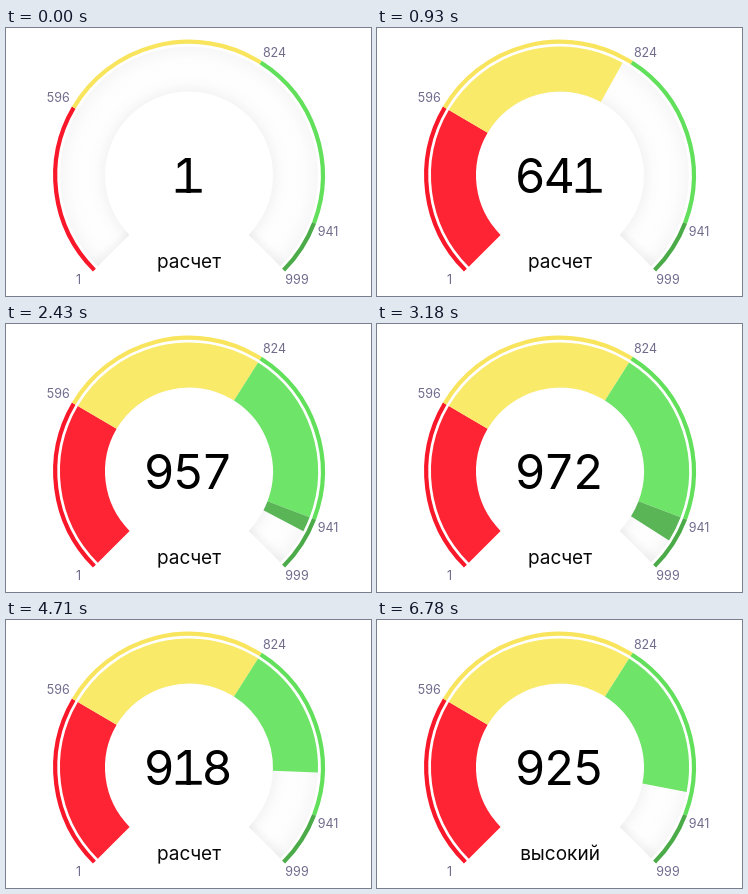
These frames come from a looping animation (365 px wide and 268 px high, 6840 ms). An HTML page with a canvas:

```html
<!DOCTYPE html>
<html lang="ru">
<head>
<meta charset="utf-8">
<title>Шкала</title>
<style>
  html, body { margin: 0; width: 100%; height: 100%; overflow: hidden; background: #fff; }
  canvas { display: block; width: 365px; height: 268px; }
</style>
</head>
<body>
<canvas id="stage"></canvas>
<script>
const W = 365, H = 268, LOOP = 6840;
const CX = 183, CY = 147.5;
const START = 135, END = 405;
const RING = 133.8, RING_WIDTH = 4.2;
const OUTER = 129, INNER = 84;

const segments = [
  { to: 210.5, ring: '#f9172a', fill: '#ff2433' },
  { to: 302.4, ring: '#f9e45e', fill: '#faea69' },
  { to: 380.8, ring: '#62e05c', fill: '#6ee568' },
  { to: END, ring: '#4bab48', fill: '#59b556' }
];
const labels = [
  ['1', 72.5, 255.5], ['596', 52.3, 74], ['824', 268.5, 28.5],
  ['941', 322, 208], ['999', 291, 255.5]
];

// [time in ms, value]
const needleKeys = [
  [30, 135], [360, 214], [720, 291], [930, 299], [1440, 349], [1830, 370],
  [2160, 380.6], [2800, 393], [3100, 393], [3180, 392.3], [3540, 365],
  [4170, 339.2], [4230, 338.8], [4920, 369.7], [5250, 371]
];
const scoreKeys = [
  [30, 1], [720, 510], [930, 641], [1440, 830], [1830, 908], [2160, 938],
  [2800, 972], [3180, 972], [3540, 938], [4170, 896], [4260, 895], [4920, 925]
];

const canvas = document.getElementById('stage');
const ctx = canvas.getContext('2d');
const dpr = window.devicePixelRatio || 1;
canvas.width = W * dpr;
canvas.height = H * dpr;

const rad = deg => deg * Math.PI / 180;
const clamp = v => Math.max(0, Math.min(1, v));

// Monotone cubic interpolation
function track(keys) {
  const n = keys.length;
  const secant = i => (keys[i + 1][1] - keys[i][1]) / (keys[i + 1][0] - keys[i][0]);
  const slopes = keys.map((_, i) => {
    if (i === 0 || i === n - 1) return 0;
    const a = secant(i - 1), b = secant(i);
    return a * b > 0 ? 2 * a * b / (a + b) : 0;
  });
  return t => {
    if (t <= keys[0][0]) return keys[0][1];
    if (t >= keys[n - 1][0]) return keys[n - 1][1];
    let i = 0;
    while (t > keys[i + 1][0]) i++;
    const [t0, v0] = keys[i], [t1, v1] = keys[i + 1];
    const h = t1 - t0, u = (t - t0) / h, w = 1 - u;
    return v0 * (1 + 2 * u) * w * w + v1 * u * u * (3 - 2 * u)
      + h * u * w * (slopes[i] * w - slopes[i + 1] * u);
  };
}
const needleAt = track(needleKeys);
const scoreAt = track(scoreKeys);

function arc(from, to, radius, width, color) {
  ctx.beginPath();
  ctx.arc(CX, CY, radius, rad(from), rad(to));
  ctx.lineWidth = width;
  ctx.strokeStyle = color;
  ctx.stroke();
}

function band(from, to, color) {
  arc(from, to, (INNER + OUTER) / 2, OUTER - INNER, color);
}

const shade = ctx.createRadialGradient(CX, CY, INNER, CX, CY, OUTER);
shade.addColorStop(0, '#f5f5f5');
shade.addColorStop(0.2, '#fcfcfc');
shade.addColorStop(0.4, '#fefefe');
shade.addColorStop(0.7, '#fdfdfd');
shade.addColorStop(1, '#f7f7f7');

function drawTrack() {
  band(START, END, shade);
  for (let i = 0; i < 5; i++) {
    const size = 5 - i;
    band(START, START + size, 'rgba(0,0,0,0.006)');
    band(END - size, END, 'rgba(0,0,0,0.006)');
  }
}

function drawGauge(needle) {
  let from = START;
  for (const s of segments) {
    arc(from, s.to, RING, RING_WIDTH, s.ring);
    if (needle > from) band(from, Math.min(needle, s.to), s.fill);
    from = s.to;
  }
}

function drawDigit(d, x) {
  const base = 164.7;
  if (d === '1') {
    const right = ctx.measureText(d).actualBoundingBoxRight;
    ctx.fillText(d, x + 3.4 - right, base);
    ctx.fillRect(x - 12.5, base - 3.8, 26, 3.8);
    return;
  }
  ctx.fillText(d, x, base);
  if (d === '0') {
    ctx.beginPath();
    ctx.moveTo(x - 9, base - 6);
    ctx.lineTo(x + 9, base - 29);
    ctx.lineWidth = 3.4;
    ctx.strokeStyle = '#000';
    ctx.stroke();
  }
}

function drawScore(value) {
  const text = String(Math.round(value));
  ctx.font = '400 48px Inter, sans-serif';
  ctx.fillStyle = '#000';
  [...text].forEach((d, i) => drawDigit(d, 182.2 + (i - (text.length - 1) / 2) * 29));
}

function drawWord(text, alpha) {
  if (alpha <= 0) return;
  ctx.globalAlpha = alpha;
  ctx.font = '400 19px Inter, sans-serif';
  ctx.fillStyle = '#080808';
  ctx.fillText(text, 183, 240);
  ctx.globalAlpha = 1;
}

function drawLabels() {
  ctx.font = '400 12.5px Inter, sans-serif';
  ctx.fillStyle = '#716b8c';
  for (const [text, x, y] of labels) ctx.fillText(text, x, y);
}

function draw(t) {
  ctx.setTransform(dpr, 0, 0, dpr, 0, 0);
  ctx.fillStyle = '#fff';
  ctx.fillRect(0, 0, W, H);
  ctx.textAlign = 'center';
  drawTrack();
  drawGauge(needleAt(t));
  drawLabels();
  drawScore(scoreAt(t));
  drawWord('расчет', 1 - clamp((t - 5200) / 345));
  drawWord('высокий', clamp((t - 5545) / 335));
}

const begin = performance.now();
function tick() {
  draw((performance.now() - begin) % LOOP);
  requestAnimationFrame(tick);
}
tick();
</script>
</body>
</html>
```
